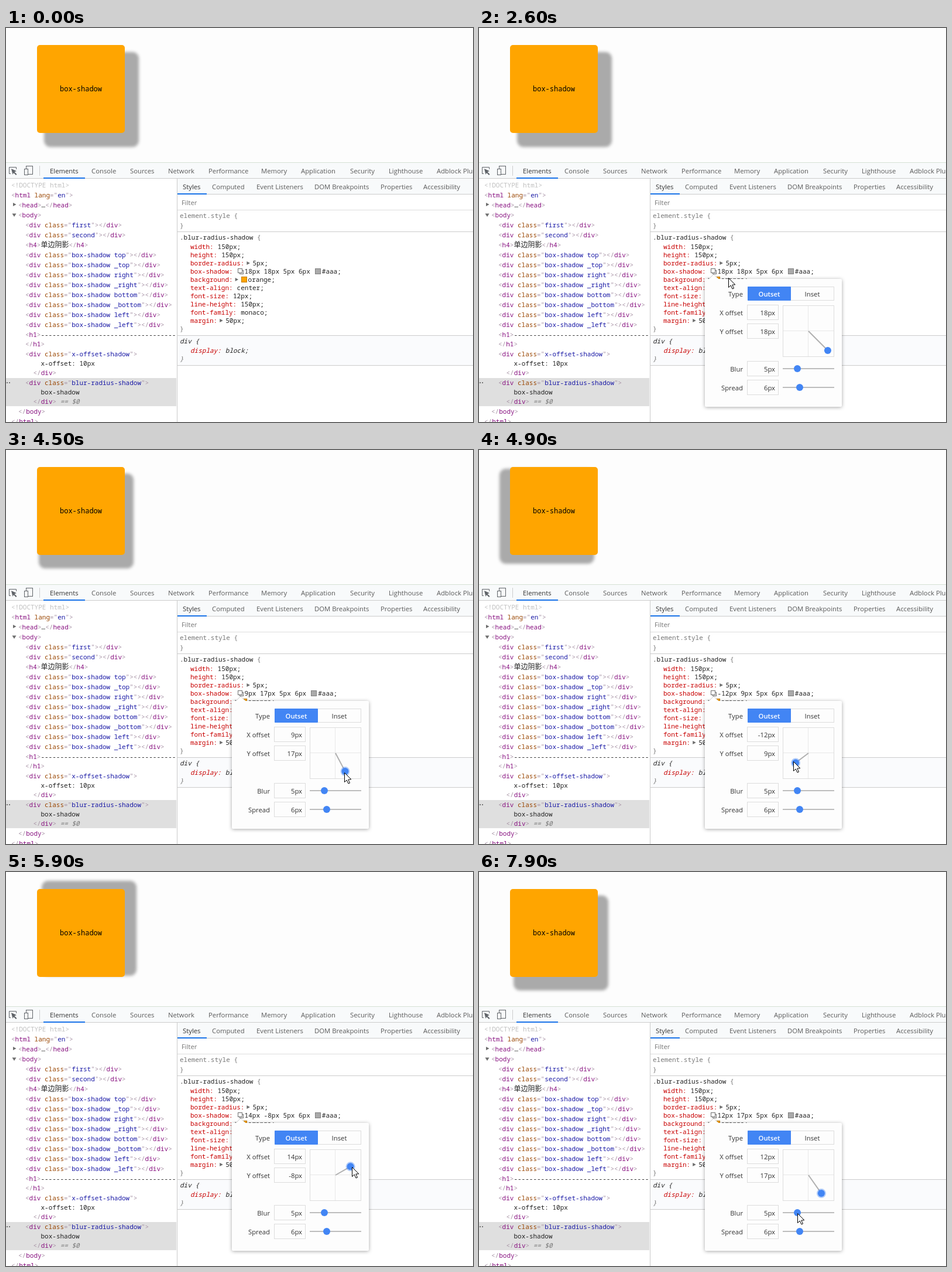
Animation, 798 px wide and 672 px high, one loop 8000 ms. Source, as an HTML page with a canvas:

```html
<!DOCTYPE html>
<html lang="en">
<head>
<meta charset="utf-8">
<title>Shadow editor</title>
<style>
html, body { margin: 0; width: 100%; height: 100%; overflow: hidden; background: #fdfdfd; }
canvas { display: block; }
</style>
</head>
<body>
<canvas id="stage" width="798" height="672"></canvas>
<script>
const ctx = document.getElementById('stage').getContext('2d');
const LOOP = 8000, TICK = 100;
const UI = '11.3px "Open Sans", "Noto Sans", sans-serif';
const UI_BOLD = '600 ' + UI;
const CODE = '11px "Noto Sans Mono", "DejaVu Sans Mono", monospace';
const CODE_ITALIC = 'italic ' + CODE;
const CJK = '12px "Noto Sans CJK SC", "Noto Sans CJK", sans-serif';
const BLUE = '#4285f4', GREY = '#a894a6', INK = '#222', RED = '#c80000', LINE = '#ccc';

// Dial geometry: centre and pixels per unit of offset.
const DIAL = { x: 563, y: 517, unit: 1.83 };
const DRAG_START = 4200, DRAG_END = 7200, LAG = 60;

// Keys are [time, x, y].
const moves = [
  [100, 747, 67], [200, 508, 136], [300, 500, 133], [400, 480, 143], [500, 441, 136],
  [600, 455, 260], [700, 471, 381], [800, 440, 414], [900, 415, 425],
  [1200, 408, 420], [1500, 402, 417], [2500, 402, 417], [3000, 520, 463],
  [3200, 553, 490], [3300, 573, 510], [3400, 580, 532], [3600, 594, 557], [3800, 594, 549],
  [7200, 586, 549], [7400, 570, 580], [7600, 548, 616], [7700, 541, 604], [7900, 544, 582]
];
const drag = [
  [4200, 16.9, 17.5], [4500, 8, 18], [4800, -10.8, 10.9], [4900, -14.2, 7.6],
  [5100, -17, -2.7], [5400, -13, -13], [5550, -5, -16.5], [5700, 6, -15.5],
  [5800, 13.5, -9.8], [5900, 15.3, -7.6], [6000, 16.4, -4], [6200, 17, 4],
  [6400, 16.5, 12], [6600, 13, 17], [6700, 12.5, 17.5]
];

function along(keys, t) {
  const i = keys.findIndex(k => k[0] > t);
  if (i < 0) return keys[keys.length - 1].slice(1);
  if (i === 0) return keys[0].slice(1);
  const [a, b] = [keys[i - 1], keys[i]];
  const p = (t - a[0]) / (b[0] - a[0]);
  return [a[1] + (b[1] - a[1]) * p, a[2] + (b[2] - a[2]) * p];
}

function pointerAt(t) {
  if (t < DRAG_START || t > DRAG_END) return along(moves, t);
  const [x, y] = along(drag, t);
  return [DIAL.x + x * DIAL.unit, DIAL.y + y * DIAL.unit];
}

function offsetAt(t) {
  return t <= DRAG_START ? [18, 18] : along(drag, t - LAG).map(Math.trunc);
}

function fill(x, y, w, h, color) {
  ctx.fillStyle = color;
  ctx.fillRect(x, y, w, h);
}

function frame(x, y, w, h, color) {
  ctx.strokeStyle = color;
  ctx.lineWidth = 1;
  ctx.strokeRect(x + 0.5, y + 0.5, w - 1, h - 1);
}

function round(x, y, w, h, r, color) {
  ctx.fillStyle = color;
  ctx.beginPath();
  ctx.roundRect(x, y, w, h, r);
  ctx.fill();
}

function poly(points, color) {
  ctx.beginPath();
  points.forEach(([x, y]) => ctx.lineTo(x, y));
  ctx.closePath();
  ctx.fillStyle = color;
  ctx.fill();
}

function stroke(points, color, width) {
  ctx.beginPath();
  points.forEach(([x, y]) => ctx.lineTo(x, y));
  ctx.strokeStyle = color;
  ctx.lineWidth = width;
  ctx.stroke();
}

function dot(x, y, r, color) {
  ctx.beginPath();
  ctx.arc(x, y, r, 0, 7);
  ctx.fillStyle = color;
  ctx.fill();
}

// Draws text on its baseline and returns the x where it ends.
function text(s, x, y, color = INK, font = CODE, align = 'left') {
  ctx.font = font;
  ctx.fillStyle = color;
  ctx.textAlign = align;
  ctx.fillText(s, x, y);
  return x + ctx.measureText(s).width;
}

function markup(s, x, y) {
  const parts = s.match(/<\/?|>|="|"|[^<>="]+|=/g);
  let prev = '', inTag = false, inValue = false;
  for (const part of parts) {
    let color = INK;
    if (/^(<\/?|>|="|")$/.test(part)) color = GREY;
    else if (prev[0] === '<') color = '#881280';
    else if (inValue) color = '#1a1aa6';
    else if (inTag) color = '#994500';
    if (color === '#881280' && part.includes(' ')) {
      const [name, attr] = part.split(' ');
      x = text(name + ' ', x, y, color);
      x = text(attr, x, y, '#994500');
    } else x = text(part, x, y, color);
    if (part[0] === '<') inTag = true;
    if (part === '>') inTag = false;
    if (part === '="') inValue = true;
    if (part === '"') inValue = false;
    prev = part;
  }
  return x;
}

const arrowRight = (x, y) => poly([[x, y - 3], [x + 5.5, y], [x, y + 3]], '#6e6e6e');
const arrowDown = (x, y) => poly([[x - 3.5, y - 2.5], [x + 3.5, y - 2.5], [x, y + 3]], '#6e6e6e');

function drawBox([x, y]) {
  const far = 2000;
  ctx.save();
  ctx.shadowColor = '#aaa';
  ctx.shadowBlur = 5;
  ctx.shadowOffsetX = far;
  round(53 + x - 6 - far, 29 + y - 6, 162, 162, 11, '#aaa');
  ctx.restore();
  round(53, 29, 150, 150, 5, 'orange');
  text('box-shadow', 128, 108, '#000', '12px "Noto Sans Mono", "DejaVu Sans Mono", monospace', 'center');
}

function drawToolbar() {
  fill(0, 230, 798, 27, '#f8fafb');
  fill(0, 229, 798, 1, '#d5e0d5');
  fill(0, 256, 798, 1, LINE);
  const icon = '#5f6368';
  stroke([[8, 248.5], [5.5, 248.5], [5.5, 237.5], [17.5, 237.5], [17.5, 241]], icon, 1);
  poly([[9, 240], [18, 244], [14.5, 245.5], [18.5, 249.5], [17, 251], [13, 247], [11.5, 250]], icon);
  frame(34, 235, 12, 15, icon);
  fill(31, 240, 7, 11, '#f8fafb');
  frame(31, 240, 7, 11, icon);
  fill(57, 235, 1, 17, LINE);
  const tabs = { Elements: 75, Console: 146, Sources: 212, Network: 277, Performance: 346,
    Memory: 436, Application: 504, Security: 588, Lighthouse: 654, 'Adblock Plus': 736 };
  for (const [name, x] of Object.entries(tabs)) text(name, x, 248, x === 75 ? '#333' : '#5a5a5a', UI);
  fill(64, 255, 71, 2, '#1a73e8');
}

function drawTree() {
  ctx.save();
  ctx.beginPath();
  ctx.rect(0, 257, 291, 415);
  ctx.clip();
  fill(0, 257, 292, 415, '#fff');
  fill(0, 597, 292, 48, '#dfdfdf');
  text('<!DOCTYPE html>', 9, 272, '#c0c0c0');
  markup('<html lang="en">', 9, 289);
  arrowRight(12, 301);
  markup('<head>…</head>', 21, 306);
  arrowDown(14, 319);
  markup('<body>', 21, 323);
  const box = side => 'box-shadow ' + side;
  const sides = ['top', 'right', 'bottom', 'left'].flatMap(s => [box(s), box('_' + s)]);
  ['first', 'second', '', ...sides].forEach((name, i) => {
    if (name) markupDiv(name, 340 + 17 * i, true);
  });
  const x = markup('<h4>', 33, 374);
  markup('</h4>', text('单边阴影', x, 374, INK, CJK), 374);
  markup('<h1>' + '-'.repeat(40), 33, 527);
  markup('</h1>', 33, 543);
  markupDiv('x-offset-shadow', 560);
  text('x-offset: 10px', 59.5, 576);
  markup('</div>', 46.5, 592);
  markupDiv('blur-radius-shadow', 609);
  text('box-shadow', 59.5, 625);
  text(' == $0', markup('</div>', 46.5, 641), 641, '#777', CODE_ITALIC);
  for (const d of [1, 5]) fill(d, 604, 2, 2, '#777');
  markup('</body>', 21, 658);
  markup('</html>', 9, 675);
  ctx.restore();
  fill(292, 257, 1, 415, LINE);
}

function markupDiv(name, y, closed) {
  markup(`<div class="${name}">` + (closed ? '</div>' : ''), 33, y);
}

function shadowIcon(x, y, color) {
  frame(x + 3, y + 3, 7, 7, color);
  fill(x, y, 8, 8, '#fff');
  frame(x, y, 8, 8, color);
}

function swatch(x, y, color) {
  fill(x, y, 10, 10, color);
  frame(x, y, 10, 10, 'rgba(0,0,0,.25)');
}

function drawStyles([ox, oy], hover, overIcon) {
  fill(293, 257, 505, 415, '#fff');
  fill(293, 257, 505, 27, '#f8fafb');
  const tabs = { Styles: 302, Computed: 352, 'Event Listeners': 428, 'DOM Breakpoints': 527,
    Properties: 640, Accessibility: 713 };
  for (const [name, x] of Object.entries(tabs)) text(name, x, 275, x === 302 ? '#333' : '#5a5a5a', UI);
  fill(293, 283, 505, 1, LINE);
  fill(293, 282, 50, 2, '#1a73e8');
  text('Filter', 300, 302, '#757575', UI);
  fill(293, 310, 505, 1, '#ddd');
  text('element.style {', 297, 324, '#777');
  text('}', 297, 341, '#777');
  fill(293, 347, 505, 1, LINE);
  text('.blur-radius-shadow', 297, 361);
  text('{', 429, 361, '#777');

  const rows = [['width', '150px'], ['height', '150px'], ['border-radius', '5px', 'arrow'],
    ['box-shadow', `${ox}px ${oy}px 5px 6px`, 'shadow'], ['background', 'orange', 'swatch'],
    ['text-align', 'center'], ['font-size', '12px'], ['line-height', '150px'],
    ['font-family', 'monaco'], ['margin', '50px', 'arrow']];
  rows.forEach(([name, value, kind], i) => {
    const y = 377 + 14 * i;
    if (hover) checkbox(297, y - 10);
    const end = text(':', text(name, 315, y, RED), y, RED);
    let x = end + 7;
    if (kind === 'arrow' || kind === 'swatch') {
      arrowRight(end + 4, y - 4);
      x = end + 14;
    }
    if (kind === 'swatch') {
      swatch(Math.round(x), y - 9, 'orange');
      x += 12;
    }
    if (kind === 'shadow') {
      shadowIcon(396, y - 9, overIcon ? '#90108c' : '#6e6e6e');
      x = text(value, 407.6, y) + 8;
      swatch(Math.round(x), y - 9, '#aaa');
      x += 12;
      value = '#aaa';
    }
    text(value + ';', x, y);
  });
  text('}', 297, 517, '#777');
  fill(293, 524, 505, 1, LINE);
  fill(293, 525, 505, 50, '#fafbfd');
  text('div {', 297, 538, INK, CODE_ITALIC);
  const x = text('display:', 315, 554, RED, CODE_ITALIC);
  text('block;', x + 7, 554, INK, CODE_ITALIC);
  text('}', 297, 568, '#777', CODE_ITALIC);
  fill(293, 575, 505, 1, LINE);
}

function checkbox(x, y) {
  round(x + 0.5, y, 13, 13, 2, '#0b74e8');
  stroke([[x + 3.5, y + 6.5], [x + 6, y + 9.2], [x + 11, y + 3.5]], '#fff', 2);
}

function drawTooltip(alpha) {
  ctx.save();
  ctx.globalAlpha = alpha;
  fill(417, 432, 126, 25, 'rgba(0,0,0,.12)');
  fill(414, 429, 125, 24, '#fff');
  frame(414, 429, 125, 24, '#999');
  text('Open shadow editor.', 420, 445, '#575757', UI);
  ctx.restore();
}

function field(label, value, y) {
  text(label, 451, y + 18, '#333', UI, 'right');
  frame(458, y, 54, 26, '#ddd');
  text(value + 'px', 506, y + 18, '#333', UI, 'right');
}

function slider(x, y) {
  fill(519, y - 1, 88, 2, '#bdbdbd');
  dot(x, y, 6, BLUE);
}

function drawEditor([ox, oy], focused) {
  ctx.save();
  ctx.shadowColor = 'rgba(0,0,0,.35)';
  ctx.shadowBlur = 6;
  ctx.shadowOffsetY = 1;
  round(386, 428, 234, 218, 2, '#fff');
  ctx.restore();
  poly([[392, 429], [401, 420], [410, 429]], '#fff');
  stroke([[393, 428], [401, 420], [409, 428]], '#ccc', 1);
  fill(387, 429, 232, 216, '#fdfdfd');

  text('Type', 451, 458, '#333', UI, 'right');
  frame(459, 441, 148, 24, '#ddd');
  round(459, 441, 74, 24, 1, BLUE);
  text('Outset', 496, 458, '#fff', UI_BOLD, 'center');
  text('Inset', 569.5, 458, '#333', UI, 'center');
  field('X offset', ox, 472);
  field('Y offset', oy, 504);
  field('Blur', 5, 568);
  field('Spread', 6, 600);

  frame(519, 473, 88, 88, '#ddd');
  fill(562, 474, 1, 86, '#e8e8e8');
  fill(520, 516, 86, 1, '#e8e8e8');
  const x = DIAL.x + ox * DIAL.unit, y = DIAL.y + oy * DIAL.unit;
  stroke([[DIAL.x, DIAL.y], [x, y]], '#b0b0b0', 2);
  if (focused) dot(x, y, 8, 'rgba(66,133,244,.4)');
  dot(x, y, 6, BLUE);
  slider(544, 581);
  slider(548, 613);
}

function drawPointer([x, y]) {
  ctx.save();
  ctx.translate(Math.round(x) + 0.5, Math.round(y) + 0.5);
  const shape = [[0, 0], [0, 16], [3.7, 12.5], [6.5, 18.5], [9, 17.5], [6.3, 11.6], [11.3, 11.3]];
  poly(shape, '#fff');
  stroke([...shape, shape[0]], '#000', 1);
  ctx.restore();
}

function draw(t) {
  const offset = offsetAt(t);
  const editing = t >= 2500;
  fill(0, 0, 798, 672, '#fdfdfd');
  drawBox(offset);
  drawToolbar();
  drawStyles(offset, t >= 700 && t < 2600, t >= 1300 && t < 2600);
  drawTree();
  if (t >= 1900 && !editing) drawTooltip(t < 2000 ? 0.5 : 1);
  if (editing) drawEditor(offset, t >= 4100);
  if (t >= 100) drawPointer(pointerAt(t));
}

function tick(now) {
  draw(Math.floor((now % LOOP) / TICK) * TICK);
  requestAnimationFrame(tick);
}
requestAnimationFrame(tick);
</script>
</body>
</html>
```
